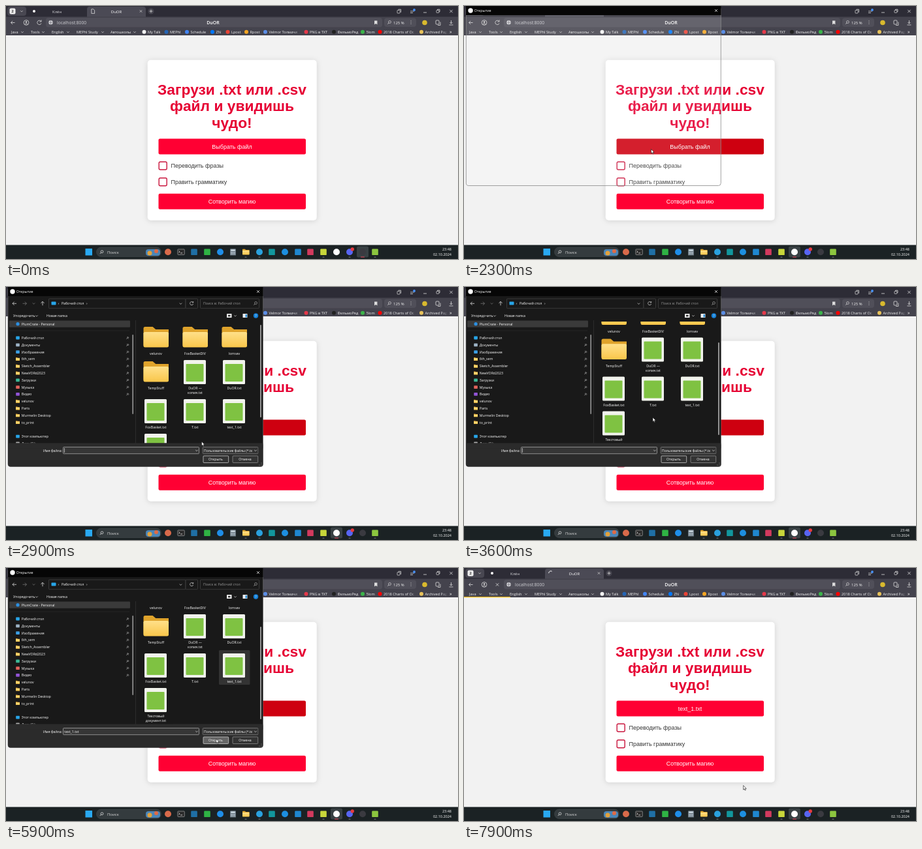
Recreate the animation shown at these times as an HTML page. Size 692 px wide and 388 px high, loop 8000 ms.

```html
<!DOCTYPE html>
<html lang="ru">
<head>
<meta charset="utf-8">
<title>File upload</title>
<style>
html, body { margin: 0; width: 100%; height: 100%; overflow: hidden; background: #f2f2f2; }
svg { display: block; width: 100vw; height: 100vh; font-family: "Open Sans", "Noto Sans", sans-serif; }
.page { font-family: "Liberation Sans", Arial, sans-serif; }
.card { filter: drop-shadow(0 1px 4px rgba(0, 0, 0, .13)); }
text { white-space: pre; }
</style>
</head>
<body>
<svg id="stage" viewBox="0 0 692 388"></svg>
<script>
const LOOP = 8000, STEP = 100, SCROLL = 41;
const BAR = '#44434d', STRIP = '#2d2c36', RED = [255, 0, 51], DARK = [206, 0, 16];

const text = (x, y, s, size = 5.2, fill = '#fff', more = '') =>
  `<text x="${x}" y="${y}" font-size="${size}" fill="${fill}" ${more}>${s}</text>`;
const mid = (x, y, s, size, fill, more = '') => text(x, y, s, size, fill, `text-anchor="middle" ${more}`);
const rect = (x, y, w, h, fill, r = 0, more = '') =>
  `<rect x="${x}" y="${y}" width="${w}" height="${h}" rx="${r}" fill="${fill}" ${more}/>`;
const disc = (x, y, r, fill, more = '') => `<circle cx="${x}" cy="${y}" r="${r}" fill="${fill}" ${more}/>`;
const line = (d, stroke = '#ddd', w = .8, more = '') =>
  `<path d="${d}" fill="none" stroke="${stroke}" stroke-width="${w}" ${more}/>`;
const group = (id, body, more = '') => `<g id="${id}" ${more}>${body}</g>`;
const cross = (x, y, r, c) => line(`M${x - r} ${y - r}l${2 * r} ${2 * r}m0 ${-2 * r}l${-2 * r} ${2 * r}`, c);
const chevron = (x, y, c = '#ddd') => line(`M${x - 1.8} ${y - .9}l1.8 1.8 1.8 -1.8`, c, .7);
const lens = (x, y, c) => disc(x, y, 1.9, 'none', `stroke="${c}" stroke-width=".7"`) +
  line(`M${x - 1.3} ${y + 1.3}l-1.9 1.9`, c, .8);
const arrow = (x, y, dir, c = '#ddd') =>
  line('M3 0H-3m2.6 -2.6L-3 0l2.6 2.6', c, .8, `transform="translate(${x} ${y}) rotate(${dir})"`);

function tabs() {
  const controls = line('M639 10h5') + rect(659, 6.5, 3.8, 3.8, 'none', .5, 'stroke="#ddd" stroke-width=".7"') +
    line('M660.5 6v-.8h3.5v3.6h-1') + cross(681.5, 8, 2.2, '#ddd');
  return rect(0, 0, 692, 18, STRIP) +
    rect(2, 1, 29, 14, '#484751', 4) + rect(5.5, 3.5, 9, 9, '#eee', 2) + mid(10, 10.3, '2', 6, '#333', 'font-weight="700"') +
    chevron(24, 8) + disc(43, 8, 2, '#fff') + text(71, 10.5, 'Клён', 6, '#d8d8dc') +
    `<path d="M124 17V5q0-4 4-4h82q4 0 4 4v12z" fill="#4b4a55"/>` +
    group('favicon', line('M130.8 4.8h3l1.8 1.8v4.8h-4.8z', '#eee', .7)) +
    group('spinner', line('M0-3.3A3.3 3.3 0 0 1 2.9 1.6', '#fff', 1)) +
    mid(169, 10.5, 'DuOR', 6, '#fff') + cross(206.5, 8, 1.7, '#ccc') +
    disc(222, 8, 4.5, '#45444e') + line('M219.6 8h4.8M222 5.6v4.8') +
    rect(599, 6.5, 4, 4.6, 'none', .6, 'stroke="#ddd" stroke-width=".7"') + line('M600.5 5.2h4v4.6') +
    line('M619 8h6m-6 2.5h4', '#ddd') + disc(625, 6, 1.9, '#4793ff') + controls;
}

function toolbar() {
  return rect(0, 16.5, 692, 28.5, BAR) +
    arrow(10.5, 25.5, 0) + disc(31, 25.5, 3.9, 'none', 'stroke="#ddd" stroke-width=".8"') +
    disc(31, 24.5, 1.2, '#ddd') + line('M28.8 27.8q2.2-2 4.4 0') +
    group('reload', line('M53.7 23.6A3.2 3.2 0 1 0 54 26.6') + line('M54 21.4v2.6h-2.6')) +
    group('stop', cross(51, 25.5, 2.2, '#ddd')) +
    rect(61, 18, 515, 14.5, '#504f59', 4) + disc(68.5, 25.3, 3.2, '#d0d0d5') +
    line('M65.5 25.3h6M68.5 22.3v6', '#504f59', .5) +
    text(78, 27.8, 'localhost:8000', 6.7, '#d0d0d5') + mid(317, 27.9, 'DuOR', 7, '#fff', 'font-weight="600"') +
    `<path d="M564 22.5h4.4v6l-2.2-1.6-2.2 1.6z" fill="#ddd"/>` +
    rect(579, 18.5, 49, 13.5, '#504f59', 4) + lens(587.5, 24.5, '#ddd') + text(593, 27.5, '125 %', 6, '#eee') +
    [22.7, 25, 27.3].map(y => disc(620, y, .5, '#ddd')).join('') +
    disc(641, 25.5, 3.8, '#d8b92e') + rect(658, 22, 5, 6, 'none', 1, 'stroke="#ddd" stroke-width=".8"') +
    line('M661 29.5h4v-5') + line('M681.5 22v5m-2-2l2 2 2-2M678.5 29h6');
}

function bookmarks() {
  const menus = [[8, 'Java', 25], [38, 'Tools', 57], [70, 'English', 95], [108, 'MEPhI Study', 148], [160, 'Автошколы', 197]];
  const links = [
    [211.5, '#f2f2f2', 'My Talk'], [245.5, '#2565b5', 'MEPhI'], [277, '#4285f4', 'Schedule'], [316, '#0077ff', 'ZN'],
    [339.5, '#ea4335', 'Lpost'], [368, '#f5a623', 'Rpost'], [397, '#5b8ee6', 'Velmor Толмачи'], [459.5, '#e5394a', 'PNG в TXT'],
    [502, '#222', 'ФильмоРяд'], [546, '#3bb54a', '5lom'], [572.5, '#f00', '2018 Charts of Oc'], [636, '#e8c25a', 'Archived Pag']
  ];
  const fade = x => rect(x, 35, 10, 9, 'url(#fade)');
  return menus.map(([x, s, c]) => text(x, 41.8, s, 5.6, '#f2f2f2') + chevron(c, 40)).join('') +
    links.map(([x, c, s]) => disc(x, 39.8, 3, c) + text(x + 5.5, 41.8, s, 5.6, '#f2f2f2')).join('') +
    fade(441) + fade(619) + fade(666) + rect(451, 35, 5, 9, BAR) + rect(629, 35, 3.5, 9, BAR) + rect(676, 35, 16, 9, BAR) +
    text(679, 41.8, '»', 7) + rect(0, 44, 0, 1.2, '#f5bd16', 0, 'id="progress"');
}

function page() {
  const title = ['Загрузи .txt или .csv', 'файл и увидишь', 'чудо!'];
  const button = (id, y) => rect(233.5, y, 225.5, 24, '#ff0033', 2.2, `id="${id}"`);
  const check = (y, s) => rect(234.2, y, 12, 12, '#fff', 2, 'stroke="#c9143c" stroke-width="1.4"') + text(252.5, y + 9.2, s, 9, '#333');
  return `<g class="page">` + rect(0, 45, 692, 322, '#f2f2f2') + rect(216.7, 82.7, 259, 246, '#fff', 5, 'class="card"') +
    title.map((s, i) => mid(346, 135.5 + i * 25.8, s, 22.8, '#e60033', 'font-weight="700"')).join('') +
    button('choose', 203.4) + mid(346, 218.7, '', 9, '#fff', 'id="chosen"') +
    check(239, 'Переводить фразы') + check(263.8, 'Править грамматику') +
    button('magic', 287.8) + mid(346, 303.1, 'Сотворить магию', 9, '#fff') + '</g>';
}

const folder = (x, y, w) => {
  const h = w * .82;
  return `<path d="M${x} ${y + h * .9}V${y + h * .08}q0-${h * .08} ${h * .08}-${h * .08}h${w * .3}l${w * .12} ${h * .13}H${x + w}v${h * .8}z" fill="#dfa32b"/>` +
    rect(x, y + h * .25, w, h * .75, 'url(#fold)', w * .06);
};

function taskbar() {
  const apps = [
    [248, '#d96a4a', 1], [288, '#1f6fa5'], [308, '#2fb344'], [328, '#1f8ee8', 1], [388, '#2aa1de', 1], [407, '#12979d'],
    [427, '#1d8fe0', 1], [447, '#1f87d0'], [466, '#d23a5e'], [486, '#c8d63a'], [506, '#fff', 1], [526, '#5865f2', 1],
    [546, '#3a3a40', 1], [565, '#8cc63f']
  ];
  const active = (id, x) => group(id, rect(x - 9, 368.5, 18, 17, '#394144', 2.5) + rect(x - 3, 384.4, 6, 1.2, '#f0455a', .6));
  return rect(0, 366.5, 692, 21.5, '#1b2224') + rect(121.5, 372, 10.5, 10.5, '#29a9f2') +
    rect(138.5, 370, 99, 14.5, '#343b3e', 7, 'stroke="#454c4f" stroke-width=".5"') + lens(147, 376.8, '#eee') +
    text(155, 379.7, 'Поиск', 6, '#ddd') +
    rect(214, 373, 22, 10, '#4b86b8', 4) + disc(220, 379, 3.5, '#e2a23c') + disc(230, 376, 3, '#e06a45') +
    active('focusRecorder', 546) + active('focusBrowser', 506) +
    apps.map(([x, c, round]) => round ? disc(x, 377.3, 5, c) : rect(x - 4.8, 372.5, 9.6, 9.6, c, 1.2)).join('') +
    rect(262.8, 373, 10.5, 8.5, '#2b2b2b', 1, 'stroke="#bbb" stroke-width=".6"') + line('M264.5 375.5l1.6 1.5-1.6 1.5m2.6.4h3', '#fff', .7) +
    rect(343, 372.3, 9, 10.3, '#6d7a84', 1.2) + rect(344.3, 373.6, 6.4, 2, '#dceaf2') +
    [0, 1, 2, 3, 4, 5].map(i => rect(344.3 + i % 3 * 2.3, 377 + (i / 3 | 0) * 2.4, 1.6, 1.6, '#b8c7d2')).join('') +
    folder(362, 372.8, 10.5) + disc(530.3, 373, 2.7, '#e53a3f') +
    [367, 388, 486, 526, 565].map(x => rect(x - 1.5, 384.7, 3, .9, '#999', .4)).join('') +
    text(682, 375.4, '23:48', 5.5, '#fff', 'text-anchor="end"') + text(682, 383.2, '02.10.2024', 5.5, '#fff', 'text-anchor="end"');
}

function sidePane() {
  const places = [
    ['Рабочий стол', '#27a5e8'], ['Документы', '#9db3c6'], ['Изображения', '#3b9fe5'], ['6th_sem'], ['Sketch_Assembler'],
    ['NewVORd2023'], ['Загрузки', '#3cb795'], ['Музыка', '#e2635c'], ['Видео', '#9254d6'], ['velunov'], ['Parts'],
    ['Murmelin Desktop'], ['to_print'], null, ['Этот компьютер', '#27a5e8'], ['Диск (C:)', '#aaa']
  ];
  const pin = y => line(`M184.5 ${y + 1.8}l1.6-1.6m-1-1.4l2.4 2.4m-1.2-3l1.8 1.8`, '#aaa', .9);
  return rect(5, 51.5, 185, 10.3, '#3a3a3a', 1) + disc(18, 56.7, 2.6, '#2c8fe0') + text(23.8, 58.7, 'PlumCrate - Personal') +
    line('M5 67h184', '#303030', .5) +
    places.map((p, i) => {
      if (!p) return '';
      const y = 78 + i * 10.8, [name, color] = p;
      return (color ? rect(15.2, y - 2.4, 5.6, 4.8, color, .8) : folder(15, y - 2.4, 6)) +
        text(23.8, y + 2, name) + (i < 9 ? pin(y) : '');
    }).join('') +
    rect(193.3, 73, 1.8, 122, '#8c8c8c', .9) + line('M198.5 51v189', '#3a3a3a', .6);
}

function files() {
  const rows = [
    [60, ['/velunov'], ['/FoxBasketDIV'], ['/lomsev']],
    [113, ['/TempStuff'], ['DuOR —', 'копия.txt'], ['DuOR.txt']],
    [173, ['FoxBasket.txt'], ['T.txt'], ['text_1.txt']],
    [226, ['Текстовый', 'документ.txt']]
  ];
  const sheet = (x, y) => rect(x - 17.5, y - 1, 34, 37, '#f1f3ec', 1.5) + rect(x - 14, y + 5, 27, 27, '#7fc242', 1);
  return rect(326, 167, 47.5, 53, '#4a4a4a', 1.5, 'id="tile"') +
    rows.map(([y, ...cells]) => cells.map((names, i) => {
      const x = 229.5 + i * 60, dir = names[0][0] === '/';
      return (dir ? folder(x - 19, y + 1, 38.5) : sheet(x, y)) +
        names.map((s, k) => mid(x, y + 44.2 + k * 7.2, s.replace('/', ''), 5.2, '#fff')).join('');
    }).join('')).join('');
}

function dialog() {
  const field = (x, y, w, h, fill, stroke = '#555', more = '') => rect(x, y, w, h, fill, 1, `stroke="${stroke}" stroke-width=".7" ${more}`);
  const shell = rect(3, 0, 390.5, 275.5, '#191919', 4, 'stroke="#666" stroke-width=".6"') +
    arrow(13, 25.3, 0) + arrow(28.5, 25.3, 180, '#777') + chevron(42.5, 25.3, '#888') + arrow(56, 25.3, 90) +
    field(65.5, 18, 209.5, 14.7, '#191919', '#484848') + rect(69.5, 22.5, 7, 5, '#27a5e8', .8) +
    text(79.5, 27, '›') + text(85, 27.2, 'Рабочий стол') + text(123, 27, '›') + chevron(267.5, 25.5) +
    field(275, 18, 18.5, 14.7, '#191919', '#484848') + line('M286.4 23.6A2.6 2.6 0 1 0 286.7 26m0-4v2h-2', '#ddd', .7) +
    field(297.5, 18, 90, 14.7, '#191919', '#484848') + text(302, 27.2, 'Поиск в: Рабочий стол', 5.2, '#999') + lens(382.5, 24.5, '#aaa') +
    text(11, 46, 'Упорядочить') + chevron(47, 44.3) + text(62, 46, 'Новая папка') +
    rect(338, 41, 7.5, 6, '#eee', .5) + rect(340, 42.8, 3.5, 2.5, '#333') + chevron(351, 44.2) +
    rect(362.5, 41, 7, 6, '#eee', .5) + rect(366.5, 42, 2.4, 4.4, '#2b8fdb') + disc(382.5, 44, 3.7, '#1581d8') +
    mid(382.5, 46, '?', 5.5, '#fff');
  const footer = rect(3.3, 239.5, 390, 35.7, '#2b2b2b', 3) + rect(3.3, 239.5, 390, 8, '#2b2b2b') +
    text(86, 252.6, 'Имя файла:', 5.2, '#fff', 'text-anchor="end"') +
    field(87.5, 245.5, 208, 10.2, '#363636', '#b5b5b5') + chevron(292, 250.8) + text(89.3, 252.5, 'text_1.txt', 5.2, '#fff', 'id="fileName"') +
    rect(89, 247, .6, 7, '#fff', 0, 'id="caret"') +
    field(301.3, 245.5, 84.5, 10.2, '#333', '#888') + text(303, 252.5, 'Пользовательские файлы (*.tx', 5) +
    rect(378.5, 246.2, 6.8, 8.8, '#333') + chevron(382, 250.8) +
    field(302, 259, 38.7, 10.5, '#333', '#ddd', 'id="open"') + mid(321, 266.2, 'Открыть', 5.2, '#fff') +
    field(347, 259, 38.7, 10.5, '#333', '#999') + mid(366, 266.2, 'Отмена', 5.2, '#fff') +
    [[391, 270], [391, 273], [388, 273]].map(([x, y]) => disc(x, y, .6, '#999')).join('');
  return group('outline', rect(3.3, 1, 390, 274.5, '#fff', 4, 'fill-opacity=".12" stroke="#8a8a8a" stroke-width=".8"')) +
    group('body', shell + group('content', sidePane() + `<g clip-path="url(#pane)">${group('files', files())}</g>` +
      rect(389, 58, 2, 142, '#929292', 1, 'id="thumb"')) + footer) +
    rect(3, 0, 390.5, 14, '#060606') + disc(10, 7, 3.7, '#fff') + text(15.7, 9.3, 'Открытие', 5.4) + cross(386, 7, 2, '#ddd');
}

document.getElementById('stage').innerHTML = `<defs>
  <linearGradient id="fade"><stop stop-color="${BAR}" stop-opacity="0"/><stop offset="1" stop-color="${BAR}"/></linearGradient>
  <linearGradient id="fold" x2="0" y2="1"><stop stop-color="#ffe08a"/><stop offset="1" stop-color="#f9c64a"/></linearGradient>
  <clipPath id="pane"><rect x="199" y="53" width="190" height="187"/></clipPath></defs>` +
  page() + tabs() + toolbar() + bookmarks() + taskbar() + group('dialog', dialog()) +
  group('cursor', '<path d="M0 0v6.6l1.5-1.4 1 2.3 1.1-.5-1-2.2h2z" fill="#fff" stroke="#111" stroke-width=".6"/>');

const el = {};
document.querySelectorAll('[id]').forEach(n => el[n.id] = n);
const set = (id, name, value) => el[id].setAttribute(name, value);
const show = (id, on) => set(id, 'visibility', on ? 'inherit' : 'hidden');
const ramp = (t, a, b) => Math.min(1, Math.max(0, (t - a) / (b - a)));
const ease = p => p * p * (3 - 2 * p);
const mix = p => `rgb(${RED.map((c, i) => Math.round(c + (DARK[i] - c) * p))})`;

// time, x, y of the pointer tip
const route = [
  [600, 547, 378], [1400, 283.5, 228], [1700, 284, 228], [1900, 288, 210], [2100, 286.5, 219.5], [2400, 286.5, 219.5],
  [2900, 299.5, 237], [3100, 296, 193], [3200, 289, 200], [3800, 289, 200], [4700, 341.7, 159], [5200, 341.7, 159],
  [5800, 321.7, 262], [6100, 321.7, 262], [6500, 369, 304], [7000, 369, 304], [7800, 427.7, 333.5]
];
function pointer(t) {
  const i = route.findIndex(k => k[0] > t);
  if (i < 1) return i ? route[route.length - 1].slice(1) : route[0].slice(1);
  const a = route[i - 1], b = route[i], p = ease(ramp(t, a[0], b[0]));
  return [a[1] + (b[1] - a[1]) * p, a[2] + (b[2] - a[2]) * p];
}

function draw(t) {
  show('cursor', t >= 600);
  set('cursor', 'transform', `translate(${pointer(t)})`);
  show('focusRecorder', t < 800);
  show('focusBrowser', t >= 800);

  set('choose', 'fill', mix(ramp(t, 1700, 2000) - ramp(t, 6100, 6400)));
  set('magic', 'fill', mix(ramp(t, 6300, 6600) - ramp(t, 7000, 7300)));
  el.chosen.textContent = t < 6100 ? 'Выбрать файл' : 'text_1.txt';

  show('dialog', t >= 2300 && t < 6100);
  set('dialog', 'opacity', t < 6000 ? 1 : .5);
  show('outline', t < 2400);
  show('body', t >= 2400);
  show('content', t >= 2500);
  const scroll = ease(ramp(t, 3300, 3700));
  set('files', 'transform', `translate(0 ${-SCROLL * scroll})`);
  set('thumb', 'y', 58 + 32 * scroll);
  show('tile', t >= 4700);
  set('tile', 'fill', t < 5000 ? '#474747' : t < 5400 ? '#555' : '#333');
  show('fileName', t >= 5100);
  show('caret', t < 5100 && t % 1000 >= 500);
  set('open', 'fill', t >= 5700 ? '#666' : '#333');

  const loading = t >= 6600;
  show('favicon', !loading);
  show('spinner', loading);
  set('spinner', 'transform', `translate(133 8) rotate(${(t - 7900) * .36 - 90})`);
  show('reload', !loading);
  show('stop', loading);
  set('progress', 'width', 68 * ramp(t, 6600, 7000) + 3 * ramp(t, 7000, 7900));
}

const start = performance.now();
function tick() {
  const t = (performance.now() - start) % LOOP;
  draw(Math.floor(t / STEP) * STEP);
  requestAnimationFrame(tick);
}
tick();
</script>
</body>
</html>
```
